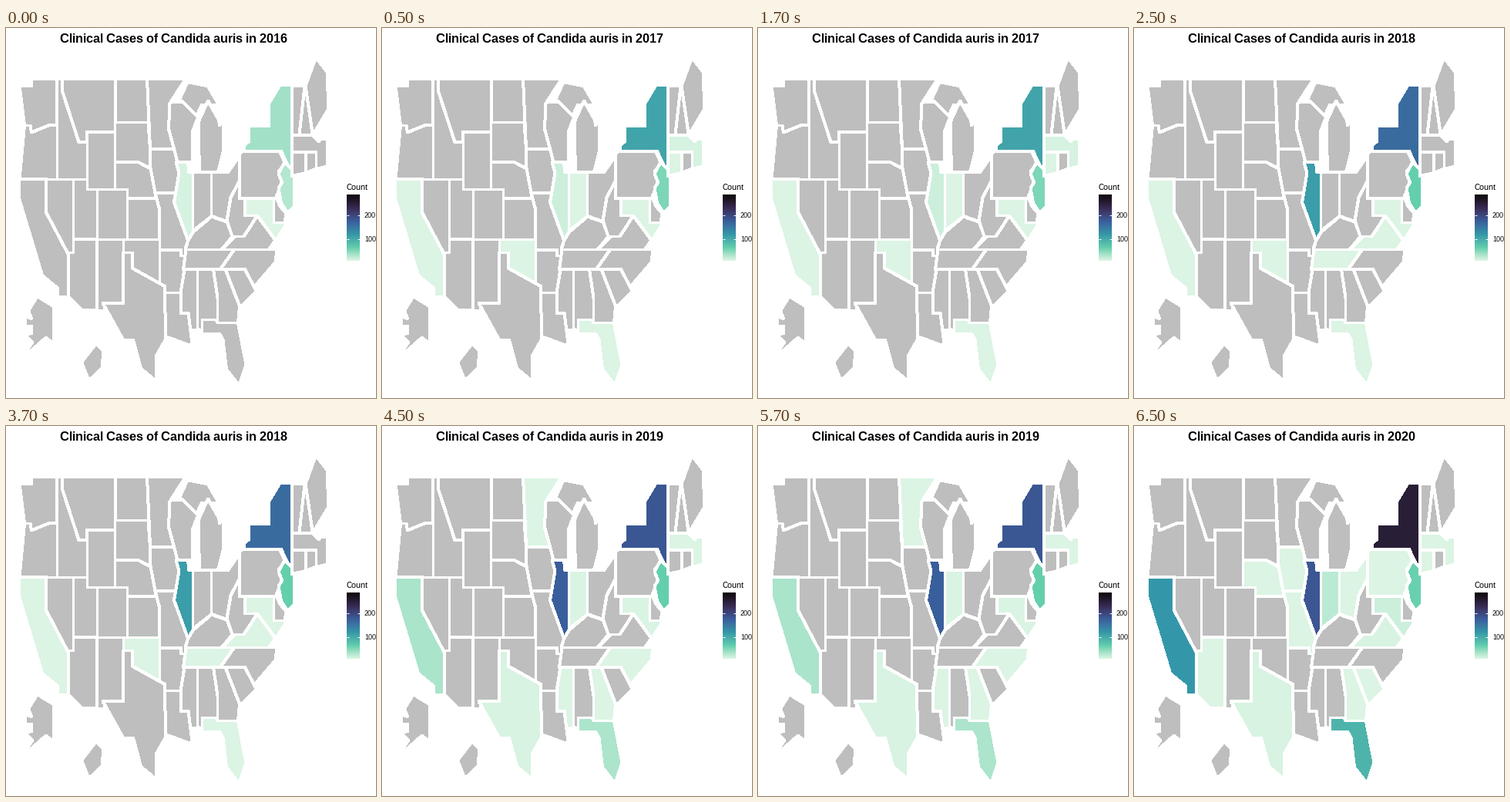
Recreate the animation shown at these times as a matplotlib script. Size 480 by 480 pixels, loop 8000 ms.

```python
import numpy as np
import matplotlib.pyplot as plt
from matplotlib.animation import FuncAnimation
from matplotlib.colors import to_rgb
from matplotlib.patches import Polygon

SIZE, DPI = 480, 72
LOW, HIGH = 1, 283
STOPS = ["#DEF5E5", "#60CEAC", "#3497A9", "#395D9C", "#382A54", "#0B0405"]
GREY = "#BEBEBE"
BORDER = 3

TO_XYZ = np.array([[.4124, .3576, .1805], [.2126, .7152, .0722], [.0193, .1192, .9505]])
WHITE = TO_XYZ.sum(axis=1)
TO_LAB = np.array([[0, 116, 0], [500, -500, 0], [0, 200, -200]])


def rgb_to_lab(rgb):
    rgb = np.asarray(rgb)
    linear = np.where(rgb > .04045, ((rgb + .055) / 1.055) ** 2.4, rgb / 12.92)
    xyz = linear @ TO_XYZ.T / WHITE
    f = np.where(xyz > .008856, np.cbrt(xyz), 7.787 * xyz + 16 / 116)
    return f @ TO_LAB.T


def lab_to_rgb(lab):
    f = lab @ np.linalg.inv(TO_LAB).T
    xyz = np.where(f > .2069, f ** 3, (f - 16 / 116) / 7.787) * WHITE
    linear = np.clip(xyz @ np.linalg.inv(TO_XYZ).T, 0, 1)
    rgb = np.where(linear > .0031308, 1.055 * linear ** (1 / 2.4) - .055, 12.92 * linear)
    return np.clip(rgb, 0, 1)


LAB_STOPS = rgb_to_lab([to_rgb(c) for c in STOPS])


def count_color(count):
    pos = (np.asarray(count) - LOW) / (HIGH - LOW)
    knots = np.linspace(0, 1, len(STOPS))
    lab = np.stack([np.interp(pos, knots, channel) for channel in LAB_STOPS.T], axis=-1)
    return lab_to_rgb(lab)


CASES = {
    2016: dict(NY=30, NJ=22, IL=5, MD=1),
    2017: dict(NY=100, NJ=46, IL=10, MA=5, IN=2, CA=2, OK=2, FL=2, CT=2, MD=2),
    2018: dict(NY=156, IL=107, NJ=56, CA=2, OK=2, FL=2, TN=2, VA=2, MD=2),
    2019: dict(NY=177, IL=169, NJ=56, CA=26, FL=25, TX=4, IN=3, MD=3, MN=2,
               MA=2, MS=2, GA=2, NC=2),
    2020: dict(NY=248, IL=178, CA=114, FL=84, NJ=54, IN=18, MD=10, VA=4, TX=4,
               AZ=2, NE=2, IA=2, MO=2, OH=2, PA=2, GA=2, SC=2, CT=2, MA=2),
}
YEARS = list(CASES)

# Full native hinting on the pixel grid
plt.rcParams.update({"font.family": "Liberation Sans", "text.hinting": "native",
                     "text.hinting_factor": 1})
fig = plt.figure(figsize=(SIZE / DPI, SIZE / DPI), dpi=DPI, facecolor="white")
ax = fig.add_axes([0, 0, 1, 1])
ax.axis("off")

states = []


def state(code, *coords):
    """Outline with a white border; it hides whatever earlier states lie under it."""
    patch = Polygon(np.reshape(coords, (-1, 2)), facecolor=GREY, edgecolor="white",
                    linewidth=BORDER, joinstyle="round", antialiased=False)
    states.append((code, ax.add_patch(patch)))


def box(code, left, top, right, bottom):
    state(code, left, top, right, top, right, bottom, left, bottom)


# West
state("OR", 24.3, 120, 65.5, 120, 65.5, 196, 16.5, 196)
state("WA", 17.5, 75, 33, 75, 33, 66, 65.5, 66, 65.5, 126, 56, 126, 33, 135.5, 31.5, 126.5, 24, 126.5)
box("ID", 65.5, 66, 104.5, 196)
state("MT", 73, 66, 141.5, 66, 141.5, 135, 104.5, 135, 104.5, 148, 94.5, 148, 73, 82)
box("UT", 86.5, 196, 117.5, 274)
box("WY", 104.5, 135, 141.5, 209)
state("AZ", 80, 274, 117.5, 274, 117.5, 365.5, 98, 365.5, 80, 348)
box("NV", 52, 196, 86.5, 291)
state("CA", 16.5, 196, 52, 196, 52, 239, 80.5, 293, 81.5, 348.5, 67.5, 348.5, 67.5, 338, 47, 321, 17.5, 223)
state("NM", 117.5, 274, 152, 274, 152, 357, 127, 357, 127, 365.5, 117.5, 365.5)
state("AK", 40.5, 348, 61.5, 361, 61.5, 410, 52, 401.5, 20, 430, 34, 408, 24.5, 398,
      33, 396, 33, 386.5, 25.5, 386.5, 25.5, 374.5, 33, 377, 29, 367)
state("HI", 117, 409, 126.5, 418.5, 124.5, 441, 107.5, 457.5, 98, 433.5)

# Plains and Upper Midwest
box("KS", 156.5, 221, 199, 274)
state("NE", 141.5, 165, 187, 165, 192, 203, 197.5, 221, 141.5, 221)
box("CO", 117.5, 209, 156.5, 274)
box("ND", 141.5, 66, 184.5, 122.5)
state("SD", 141.5, 122.5, 184.5, 122.5, 187, 158, 187, 182, 171.5, 174, 141.5, 174)
state("WI", 205, 97, 229, 95.5, 250, 113.5, 242.5, 133, 241.5, 174, 222.5, 174, 205, 130)
state("MN", 183, 66, 233, 66, 212.5, 98, 211, 131, 218, 157, 187, 157)
state("MI", 225, 93, 235.5, 70, 262, 75.5, 276, 99.5, 254, 99.5, 247.5, 114, 230, 96.5)
state("MI", 251, 187, 249.5, 122, 262, 94.5, 276, 119, 277, 126, 281.5, 115, 282.5, 158, 275, 187)

# Mississippi valley and Gulf
state("AR", 199, 288, 236, 288, 226.5, 343.5, 199, 343.5)
state("MO", 193.5, 214, 225, 214, 236.5, 277, 233.5, 295.5, 227, 295.5, 227, 288, 199, 288, 199, 235)
state("IA", 187, 157, 218, 157, 225.5, 186, 222.5, 211, 219, 214, 193.5, 214, 187.5, 182)
state("MS", 231.5, 313, 248.5, 313, 248.5, 391.5, 226, 391.5, 226.5, 343.5)
state("LA", 205.5, 343.5, 227, 343.5, 227, 370, 236.5, 370, 242, 413, 206.5, 400)
box("OK", 151.5, 274, 199, 331)
state("TX", 152, 291.5, 164, 291.5, 164.5, 312, 206, 335, 207, 404, 194.5, 426, 194.5, 458,
      175, 442, 165, 404.5, 152, 404.5, 125.5, 357, 152, 357)

# Ohio valley and South
state("IL", 220.5, 174, 236, 174, 237.5, 187, 242.5, 187, 242.5, 265, 236.5, 277, 218, 226, 224.5, 188)
state("IN", 242.5, 187, 266.5, 187, 266.5, 244.5, 248, 259, 242.5, 265)
state("OH", 266.5, 187, 288, 187, 303, 165.5, 303, 200, 291.5, 220, 286.5, 251, 266.5, 244)
state("KY", 266.5, 244.5, 287.5, 252, 293.5, 270.5, 280, 287.5, 232.5, 287.5, 236, 276, 242.5, 265)
state("TN", 233.5, 287.5, 296, 287.5, 278, 313, 230, 313)
state("GA", 269, 313, 285, 313, 304, 350, 301, 382.5, 274.5, 382.5, 274.5, 350)
state("AL", 248.5, 313, 269, 313, 274.5, 350, 274.5, 385, 255, 394, 248.5, 390)
state("FL", 254.5, 378.5, 273, 378.5, 274.5, 382.5, 301, 382.5, 311.5, 437, 302.5, 464,
      286, 443, 281.5, 405, 277, 396.5, 254.5, 396.5)
state("SC", 284.5, 313, 310, 313, 325, 342, 304, 363)
state("NC", 296, 287.5, 351.5, 287.5, 349.5, 304, 322, 336, 310, 313, 278, 313)
state("VA", 279.5, 287.5, 296.5, 270.5, 308.5, 270.5, 326, 243.5, 350, 275, 341, 287.5)
state("WV", 303, 198, 305, 221, 312, 221, 326, 243.5, 308.5, 270.5, 293.5, 270.5, 286.5, 250, 291.5, 220)

# Northeast
state("MD", 310, 221, 347.5, 221, 347.5, 252.5, 365, 252.5, 350, 276, 326, 243.5, 310, 243.5)
state("DE", 350, 219, 355.5, 231, 363, 240, 362, 252.5, 347.5, 252.5, 347.5, 221)
state("PA", 303, 163, 307, 160, 355, 160, 362, 175, 354, 186, 358, 200, 350, 221, 303, 221)
state("NY", 341.5, 97, 355, 74.5, 371, 74.5, 371, 190, 357, 160, 309.5, 160, 309.5, 151.5,
      315.5, 147, 315.5, 127, 341.5, 127)
state("NJ", 361.5, 174, 373.5, 186, 374.5, 231, 365, 240, 357, 227, 353.5, 208, 358, 200, 353.5, 189)
box("VT", 371, 74.5, 388, 139)
state("NH", 387.5, 75, 390, 76, 397.5, 139, 380.5, 139)
state("ME", 388.5, 75, 402, 38, 416.5, 57, 418.5, 105, 398, 139)
state("MA", 371, 139, 398, 139, 406, 147, 408, 143.5, 416.5, 144.5, 416.5, 179.5, 402, 183, 371, 161)
state("CT", 371, 161, 389, 161, 389, 188, 371, 192)
state("RI", 389, 161, 402.5, 161, 402.5, 182.5, 389, 188)

title = ax.text(217.5, 19, "", size=16, weight="bold", ha="center", va="baseline")

# Legend
ramp = count_color(np.linspace(HIGH, LOW, 300))[:, None]
ax.imshow(ramp, extent=(442, 459, 302, 216), aspect="auto", interpolation="bilinear")
ax.set(xlim=(0, SIZE), ylim=(SIZE, 0))
ax.text(442, 210, "Count", size=11, va="baseline")
for value, y in ((100, 273.5), (200, 242.5)):
    ax.text(465, y + 3.5, str(value), size=9, va="baseline")
    for x in (442, 455.6):
        ax.plot([x, x + 3.4], [y, y], color="white", lw=1, solid_capstyle="butt")


def update(frame):
    year = YEARS[(frame + 3) // 4]
    title.set_text(f"Clinical Cases of Candida auris in {year}")
    cases = CASES[year]
    for code, patch in states:
        patch.set_facecolor(count_color(cases[code]) if code in cases else GREY)
    return [title, *(patch for _, patch in states)]


anim = FuncAnimation(fig, update, frames=16, interval=500, repeat=True, repeat_delay=0)
plt.show()
```
